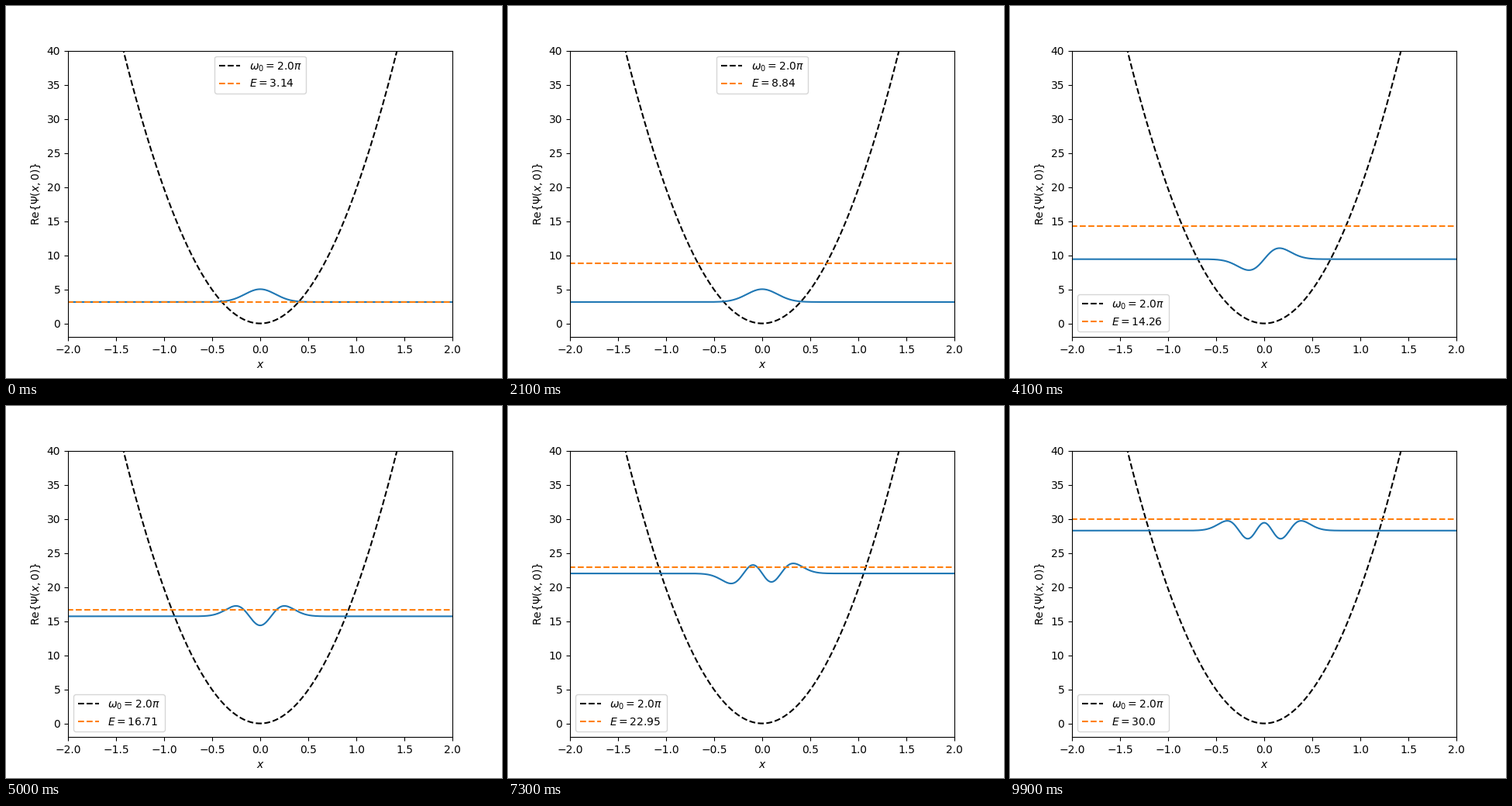
Write a matplotlib script that moves like this. It is 640 by 480 pixels and loops after 10000 ms.

```python
import math

import matplotlib.pyplot as plt
import numpy as np
from matplotlib.animation import FuncAnimation
from numpy.polynomial.hermite import hermval

FRAMES = 100
OMEGA = 2 * np.pi
ENERGIES = np.linspace(OMEGA / 2, 30, FRAMES)
x = np.linspace(-3, 3, 1201)


def level(n):
    return (n + 0.5) * OMEGA


def eigenstate(n):
    """Real part of the n-th oscillator state at t = 0."""
    xi = OMEGA * x
    norm = (OMEGA**2 / np.pi) ** 0.25 / math.sqrt(2**n * math.factorial(n))
    return norm * hermval(xi, [0] * n + [1]) * np.exp(-xi**2 / 2)


fig, ax = plt.subplots(figsize=(6.4, 4.8), dpi=100)
ax.plot(x, 0.5 * (OMEGA * x) ** 2, "k--",
        label=rf"$\omega_0 = {OMEGA / np.pi:.1f}\pi$")
wave, = ax.plot(x, level(0) + eigenstate(0), color="C0")
energy_line, = ax.plot(x, np.full_like(x, ENERGIES[0]), "--", color="C1")
ax.set_xlim(-2, 2)
ax.set_ylim(-2, 40)
ax.set_xlabel("$x$")
ax.set_ylabel(r"Re$\{\Psi(x, 0)\}$")


def update(i):
    energy = float(ENERGIES[i])
    n = int(math.floor(energy / OMEGA - 0.5 + 1e-9))
    wave.set_ydata(level(n) + eigenstate(n))
    energy_line.set_ydata(np.full_like(x, energy))
    energy_line.set_label(f"$E = {round(energy, 2)}$")
    ax.legend(loc="upper center" if n == 0 else "lower left")
    return wave, energy_line


anim = FuncAnimation(fig, update, frames=FRAMES, interval=100,
                     repeat=True, repeat_delay=0, blit=False)
plt.show()
```
